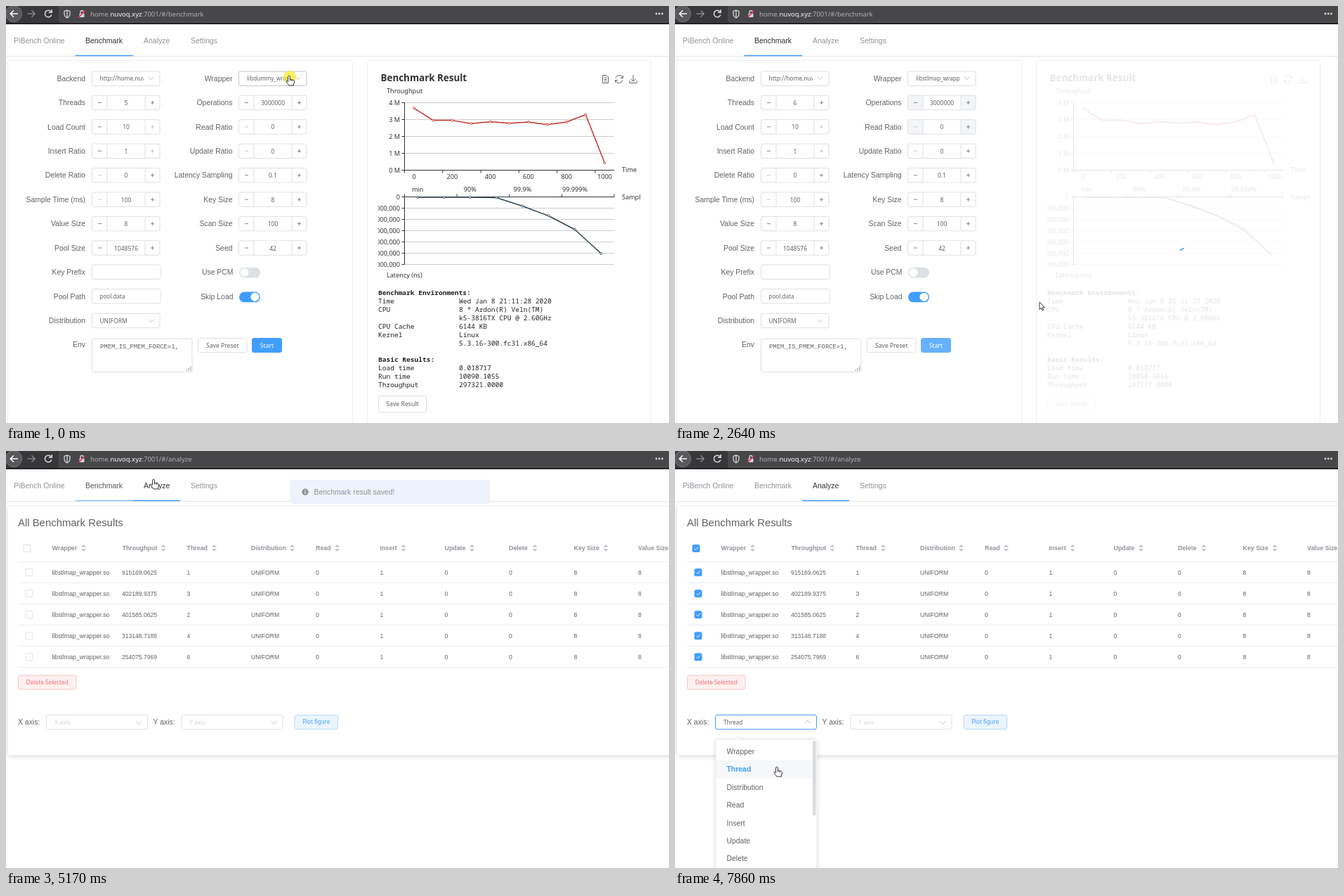
Animation of 944 by 593 pixels, one loop 8 s. Source, as an HTML page:

```html
<!DOCTYPE html>
<html lang="en">
<head>
<meta charset="utf-8">
<title>PiBench Online</title>
<style>
html, body { margin: 0; width: 100%; height: 100%; overflow: hidden; background: #fff; }
svg { display: block; width: 100vw; height: 100vh; }
text { white-space: pre; }
</style>
</head>
<body>
<svg id="stage" viewBox="0 0 944 593" xmlns="http://www.w3.org/2000/svg"></svg>
<script>
const stage = document.getElementById('stage');

const SANS = "'Liberation Sans', Arial, sans-serif";
const UI = "'Noto Sans', 'Open Sans', sans-serif";
const MONO = "'Noto Sans Mono', 'DejaVu Sans Mono', monospace";
const COURIER = "'Liberation Mono', monospace";
const BLUE = '#409eff', TEXT = '#606266', GREY = '#909399', DARK = '#303133';
const BORDER = '#dcdfe6', PALE = '#c0c4cc', LINE = '#ebeef5';

const HOLD = [220, 200, 200, 200, 200, 210, 190, 200, 210, 190, 200, 210, 210,
  200, 200, 210, 210, 230, 210, 210, 220, 200, 220, 210, 210, 220, 220, 200,
  210, 210, 200, 210, 230, 200, 200, 200, 200, 190, 140];
const LOOP = HOLD.reduce((a, b) => a + b);

// Pointer stops: step, x, y
const STOPS = [[0, 403, 99], [1, 403, 99], [3, 388, 160], [4, 388, 160], [6, 207, 137],
  [7, 207, 137], [9, 378, 485], [12, 378, 485], [13, 519, 421], [15, 519, 421],
  [17, 545, 545], [18, 553, 558], [20, 555, 561], [21, 555, 561], [22, 308, 200],
  [23, 235, 80], [24, 210, 40], [25, 210, 40], [27, 50, 130], [28, 29, 136],
  [29, 29, 136], [30, 70, 254], [32, 82, 381], [33, 82, 381], [36, 145, 449], [38, 145, 449]];
const ARROW = [5, 8, 13, 14, 15, 16, 22, 23, 26, 27, 30, 31];
const CLICKS = [0, 4, 7, 10, 21, 24, 28, 33, 37];

const RUNS = [
  { max: 4, step: 1, drops: 6,
    rate: [3.67, 2.95, 2.95, 2.76, 2.87, 2.78, 2.85, 2.7, 2.85, 3.29, 0.42],
    latency: [272, 272, 272, 272.5, 284.5, 298.5, 318, 352],
    time: '21:11:28', results: ['0.018717', '10090.1055', '297321.0000'] },
  { max: 3.5, step: 0.5, drops: 5,
    rate: [3.24, 2.53, 2.34, 2.43, 2.47, 2.42, 2.45, 2.36, 2.51, 2.43, 2.36, 2.53],
    latency: [272, 272, 272, 274.5, 291.5, 314.5, 331, 360],
    time: '21:12:07', results: ['0.014254', '11807.5000', '254075.7969'] }
];

// y is the vertical middle of the text
const text = (x, y, s, size, fill, font = SANS, extra = '') =>
  `<text x="${x}" y="${y + size * 0.36}" font-size="${size}" fill="${fill}" font-family="${font}" ${extra}>${s}</text>`;
const END = 'text-anchor="end"', MID = 'text-anchor="middle"', BOLD = 'font-weight="700"';
const box = (x, y, w, h, fill, stroke = 'none', r = 2.5, extra = '') =>
  `<rect x="${x}" y="${y}" width="${w}" height="${h}" rx="${r}" fill="${fill}" stroke="${stroke}" ${extra}/>`;
const path = (d, stroke, w = 1, fill = 'none', extra = '') =>
  `<path d="${d}" stroke="${stroke}" stroke-width="${w}" fill="${fill}" ${extra}/>`;
const dot = (x, y, r, fill, stroke = 'none', w = 1) =>
  `<circle cx="${x}" cy="${y}" r="${r}" fill="${fill}" stroke="${stroke}" stroke-width="${w}"/>`;
const group = (s, attrs) => `<g ${attrs}>${s}</g>`;
const times = (n, fn) => Array.from({ length: n }, (_, i) => fn(i)).join('');
const hline = (x1, x2, y, c) => path(`M${x1} ${y}H${x2}`, c);
const rowY = i => 103 + 34.43 * i;

const DEFS = `<defs>
  <clipPath id="backend"><rect x="130" y="90" width="66" height="26"/></clipPath>
  <clipPath id="wrapper"><rect x="340" y="90" width="65" height="26"/></clipPath>
  <clipPath id="chart"><rect x="530" y="90" width="374" height="300"/></clipPath>
  <filter id="shadow" x="-10%" y="-10%" width="120%" height="120%">
    <feDropShadow dx="0" dy="1.5" stdDeviation="3" flood-color="#000" flood-opacity=".14"/>
  </filter></defs>`;

function browserBar(page) {
  const light = '#d7d7db', white = '#f9f9fa', y = 12;
  return box(0, 0, 944, 26, '#38383b', 'none', 0) + box(76, -2, 868, 25, '#474749', '#56565a', 2) +
    box(0, 24, 944, 2, '#232326', 'none', 0) +
    dot(11, 11, 11.5, '#59595d', '#77777b') +
    path('M17 11H6.5M11 6.3L6.3 11L11 15.7', white, 1.6) +
    path('M30.500 11H41M36.500 6.300L41.200 11L36.500 15.700', '#85858a', 1.5) +
    path('M64 8A4.800 4.800 0 1 0 64.800 12.500M65.200 5V9.200H61', light, 1.6) +
    path('M87 6L91 7.500V11Q91 15 87 17Q83 15 83 11V7.500ZM87 6V17', light, 1.3) +
    box(104.5, 10.5, 7, 5.5, light, 'none', 1) + path('M106 10.500V8.500A2 2 0 0 1 110 8.500V10.500', light, 1.3) +
    path('M103 16.500L113 6.500', '#e22850', 1.6) +
    text(120, y, `home.<tspan fill="${white}">nuvoq.xyz</tspan>:7001/#/${page}`, 9.5, '#b1b1b5', UI) +
    times(3, i => dot(926 + 4.2 * i, 11, 1.4, light));
}

function tabs(k) {
  const analyze = k >= 25;
  const fade = k === 25 ? '#55585e' : GREY;
  return hline(0, 944, 71.5, '#e6e6e6') +
    text(11, 49, 'PiBench Online', 10.55, GREY) +
    text(113, 49, 'Benchmark', 10.5, analyze ? fade : DARK) +
    text(196, 49, 'Analyze', 10.5, k >= 24 ? DARK : GREY) +
    text(263, 49, 'Settings', 10.5, GREY) +
    (k <= 25 ? box(98.5, 69.8, 82.5, 1.5, BLUE, 'none', 0, `opacity="${analyze ? 0.6 : 1}"`) : '') +
    (analyze ? box(181, 69.8, 67, 1.5, BLUE, 'none', 0) : '');
}

const caret = (x, y, up) => {
  const d = up ? -2 : 2;
  return path(`M${x - 3.7} ${y - d}L${x} ${y + d}L${x + 3.7} ${y - d}`, PALE, 1);
};

function stepper(x, y, value, { low, high, focus, tint } = {}) {
  const edge = focus ? '#8cc5ff' : BORDER, cell = tint ? '#f3f5f9' : '#fff';
  const sign = (cx, off, plus) =>
    path(`M${cx - 2.500} ${y}h5` + (plus ? `M${cx} ${y - 2.500}v5` : ''), off ? PALE : '#77797e', 0.9);
  return box(x, y - 10.2, 96.5, 20.4, cell, edge) +
    box(x + 21.5, y - 9.7, 54, 19.4, '#fff', 'none', 0) +
    path(`M${x + 21.500} ${y - 10}v20M${x + 75.500} ${y - 10}v20`, BORDER) +
    sign(x + 11, low) + sign(x + 86, high, true) +
    text(x + 48.5, y + 0.5, value, 8.5, TEXT, UI, MID);
}

function button(x, y, w, h, label, size, ink, fill, edge) {
  return box(x, y, w, h, fill, edge) + text(x + w / 2, y + h / 2, label, size, ink, UI, MID);
}

function popper(x, y, w, h, body, opacity) {
  return group(box(x, y, w, h, '#fff', '#e4e7ed', 3, 'filter="url(#shadow)"') +
    path(`M${x + 26} ${y + 0.500}l4.500 -4.500l4.500 4.500`, '#e4e7ed', 1, '#fff') + body, `opacity="${opacity}"`);
}

function form(k) {
  const left = ['Backend', 'Threads', 'Load Count', 'Insert Ratio', 'Delete Ratio', 'Sample Time (ms)',
    'Value Size', 'Pool Size', 'Key Prefix', 'Pool Path', 'Distribution', 'Env'];
  const right = ['Wrapper', 'Operations', 'Read Ratio', 'Update Ratio', 'Latency Sampling', 'Key Size',
    'Scan Size', 'Seed', 'Use PCM', 'Skip Load'];
  const leftVals = [k >= 7 ? 6 : 5, 10, 1, 0, 100, 8, 1048576];
  const rightVals = [3000000, 0, 0, 0.1, 8, 100, 42];
  const open = k >= 1 && k <= 3;
  const wrapEdge = open ? BLUE : k === 0 || k === 4 ? PALE : BORDER;
  const toggle = (y, on) => box(332, y - 7.3, 30, 14.8, on ? BLUE : BORDER, 'none', 7.4) +
    dot(on ? 354.5 : 339.5, y, 6.1, '#fff');
  let s = path('M2.500 600V80Q2.500 77.500 5 77.500H491Q493.500 77.500 493.500 80V600', LINE) +
    left.map((l, i) => text(113, rowY(i), l, 10.43, TEXT, SANS, END)).join('') +
    right.map((l, i) => text(i < 8 ? 322.5 : 323.5, rowY(i), l, 10.43, TEXT, SANS, END)).join('');

  s += box(122.5, 93, 96.5, 20.4, '#fff', BORDER) + caret(206.5, 102.8) +
    text(133.5, 103.3, 'http://home.nuvoq.xyz', 8.4, TEXT, UI, 'clip-path="url(#backend)"') +
    box(331.5, 93, 96.5, 20.4, '#fff', wrapEdge) + caret(415.5, 102.8, open) +
    text(343, 103.3, k >= 4 ? 'libstlmap_wrapper.so' : 'libdummy_wrapper.so', 8.1, TEXT, UI, 'clip-path="url(#wrapper)"');

  leftVals.forEach((v, i) => s += stepper(122.5, rowY(i + 1), v,
    { low: i === 3 || i === 4, high: i === 1 || i === 2, focus: i === 0 && k >= 6 && k <= 10 }));
  rightVals.forEach((v, i) => s += stepper(331.5, rowY(i + 1), v,
    { low: i === 1 || i === 2, tint: i < 2 && k >= 4 }));

  s += box(122.5, 368, 97.5, 20.4, '#fff', BORDER) + box(122.5, 402.5, 97.5, 20.4, '#fff', BORDER) +
    text(133.5, 413.5, 'pool.data', 8.1, TEXT, UI) +
    box(122.5, 437.3, 96.5, 20.4, '#fff', BORDER) + text(133.5, 448, 'UNIFORM', 8.4, TEXT, UI) + caret(206.5, 447.5) +
    toggle(379, false) + toggle(413.8, true) +
    box(122.5, 473, 142.5, 47.5, '#fff', BORDER) +
    text(134, 483.3, 'PMEM_IS_PMEM_FORCE=1,', 8.9, TEXT, COURIER) +
    times(3, i => times(i + 1, j => box(262 - 2.8 * j, 512.5 + 2.4 * i, 1.4, 1.4, '#8c8c8c', 'none', 0))) +
    button(273.5, 472.5, 69.5, 20, 'Save Preset', 8.65, TEXT, '#fff', BORDER);
  const start = k >= 9 && k <= 17 ? '#66b1ff' : BLUE;
  s += button(350.5, 472.5, 42, 20, 'Start', 8.6, '#fff', start, start);

  if (k >= 1 && k <= 4) {
    const hover = k === 1 ? 0 : 1;
    const items = box(332, 128.5 + 25.4 * hover, 137, 25.4, '#f5f7fa', 'none', 0) +
      ['libdummy_wrapper.so', 'libstlmap_wrapper.so'].map((l, i) => {
        const picked = (k >= 4 ? 1 : 0) === i;
        return text(346, 141.5 + 25.4 * i, l, 10.4, picked ? BLUE : TEXT, SANS, picked ? BOLD : '');
      }).join('');
    s += popper(331.5, 124, 138, 59, items, k === 1 || k === 4 ? 0.55 : 1);
  }
  return s;
}

function line(points, color) {
  return path('M' + points.map(p => p.join(' ')).join('L'), color, 1.5, 'none', 'stroke-linejoin="round"') +
    points.map(p => dot(p[0], p[1], 1.5, '#fff', color, 0.9)).join('');
}

function charts(run) {
  const x0 = 567.5, x1 = 866, ink = '#333', grid = '#ccc';
  const n = run.rate.length, w = (x1 - x0) / n, rows = run.max / run.step;
  const label = (x, y, s, extra) => text(x, y, s, 9.1, ink, UI, extra);
  let s = label(542, 121, 'Throughput') + label(877, 233, 'Time') + label(877, 272, 'Sampl');

  for (let i = 0; i <= rows; i++) {
    const y = 233.5 - 96 * i / rows;
    s += (i ? hline(x0, x1, y, grid) : '') + hline(x0 - 4, x0, y, ink) +
      label(561, y, `${i * run.step} M`, END);
  }
  s += path(`M${x0} 137.500V233.500H${x1}`, ink);
  for (let i = 0; i <= n; i += 2) {
    s += path(`M${x0 + w * i} 233.500v4`, ink);
    if (i < n) s += label(x0 + w * (i + 0.5), 243, i * 100, MID);
  }
  s += line(run.rate.map((v, i) => [x0 + w * (i + 0.5), 233.2 - 95.7 * v / run.max]), '#c23531');

  for (let i = 0; i <= run.drops; i++) {
    const y = 271.5 + 96 * i / run.drops;
    s += (i ? hline(x0, x1, y, grid) : '') + hline(x0 - 4, x0, y, ink) +
      label(561, y, i ? `${i},000,000` : '0', END);
  }
  s += path(`M${x0} 367.500V271.500H${x1}`, ink);
  const c = (x1 - x0) / 8;
  ['min', '90%', '99.9%', '99.999%'].forEach((l, i) => s += label(x0 + c * (2 * i + 0.5), 261, l, MID));
  s += times(5, i => path(`M${x0 + c * 2 * i} 267.500v4`, ink)) +
    line(run.latency.map((y, i) => [x0 + c * (i + 0.5), y]), '#2f4554') +
    label(542, 383, 'Latency (ns)');
  return group(s, 'clip-path="url(#chart)"');
}

function result(k) {
  const run = RUNS[k >= 16 ? 1 : 0], icon = '#666';
  const mono = (x, y, s, extra) => text(x, y, s, 9.56, '#222', MONO, extra);
  const rows = [['Time', `Wed Jan 8 ${run.time} 2020`], ['CPU', '8 * Ardon(R) Veln(TM)'],
    ['', 'k5-3816TX CPU @ 2.60GHz'], ['CPU Cache', '6144 KB'], ['Kernel', 'Linux'],
    ['', '5.3.16-300.fc31.x86_64']];
  let s = text(533.5, 102, 'Benchmark Result', 13.4, '#333', UI, BOLD) +
    path('M849.500 98.500H855L857.500 101V109.500H849.500ZM851.500 102H855.500M851.500 104.500H855.500M851.500 107H855.500', icon) +
    path('M868 102.500A5.200 5.200 0 0 1 878 102M878 105.500A5.200 5.200 0 0 1 868 106M878.500 99V102.500H875M867.500 109V105.500H871', icon) +
    path('M893 98V107M889.500 103.800L893 107.300L896.500 103.800M888 106V109.500H898V106', icon) +
    charts(run) + mono(530, 408, 'Benchmark Environments:', BOLD);
  rows.forEach((r, i) => s += mono(530, 420 + 11.9 * i, r[0]) + mono(645, 420 + 11.9 * i, r[1]));
  s += mono(530, 502.5, 'Basic Results:', BOLD);
  ['Load time', 'Run time', 'Throughput'].forEach((l, i) =>
    s += mono(530, 514.5 + 11.9 * i, l) + mono(645, 514.5 + 11.9 * i, run.results[i]));
  const hot = k >= 18;
  s += button(530.5, 554.5, 68, 23.5, 'Save Result', 8.7, hot ? BLUE : TEXT, hot ? '#ecf5ff' : '#fff', hot ? '#8cc5ff' : BORDER);

  const veil = { 11: 0.5, 16: 0.4 }[k] || (k >= 12 && k <= 15 ? 0.88 : 0);
  if (veil) {
    s += box(515, 78, 403, 520, '#fff', 'none', 0, `opacity="${veil}"`);
    const len = 5 + 22 * ((k + 2) % 3), turn = 50 + 110 * (k - 13);
    s += `<circle cx="716" cy="335" r="12.5" fill="none" stroke="${BLUE}" stroke-width="1.5" ` +
      `stroke-linecap="round" stroke-dasharray="${len} 90" transform="rotate(${turn} 716 335)"/>`;
  }
  return s + path('M514.500 600V80Q514.500 77.500 517 77.500H915.500Q918.500 77.500 918.500 80V600', LINE);
}

function table(k) {
  const checked = k >= 29;
  const heads = [['Wrapper', 65.5, 110.5], ['Throughput', 165.5, 224], ['Thread', 257.5, 296.5],
    ['Distribution', 349, 407.5], ['Read', 441, 471.5], ['Insert', 532.5, 566], ['Update', 624.5, 663.5],
    ['Delete', 716, 753], ['Key Size', 808.5, 854], ['Value Size', 900, 960]];
  const runs = [['915169.0625', 1], ['402189.9375', 3], ['401585.0625', 2], ['313148.7188', 4], ['254075.7969', 6]];
  const check = (x, y) => box(x - 5, y - 5, 10, 10, checked ? BLUE : '#fff', checked ? BLUE : BORDER, 1.5) +
    (checked ? path(`M${x - 2.600} ${y}l2 2l3.400 -4`, '#fff') : '');
  const select = (x, label, ink, edge, up) => box(x, 375.3, 144, 20.4, '#fff', edge) +
    text(x + 11.5, 386, label, 8.3, ink, UI) + caret(x + 131.5, up ? 385 : 386.5, up);

  let s = box(2.5, 78, 960, 354.5, '#fff', LINE, 3, 'filter="url(#shadow)"') +
    box(0, 72, 944, 5, '#fff', 'none', 0) +
    text(17, 101.5, 'All Benchmark Results', 14.9, TEXT) + check(30, 138.5);
  heads.forEach(([l, x, a]) => s += text(x, 138, l, 8.85, GREY, SANS, BOLD) +
    path(`M${a - 3.500} 136.800h7l-3.500 -3.700zM${a - 3.500} 139.200h7l-3.500 3.700z`, 'none', 0, PALE));
  s += times(6, i => hline(17, 944, 157.5 + 30 * i, LINE));
  runs.forEach(([rate, threads], i) => {
    const y = 172.7 + 30.05 * i;
    s += check(33, y);
    ['libstlmap_wrapper.so', rate, threads, 'UNIFORM', 0, 1, 0, 0, 8, 8].forEach((v, c) =>
      s += text(heads[c][1] - (c === 1 ? 0.5 : 0), y, v, c === 0 ? 8.73 : 8.58, TEXT));
  });
  const open = k >= 33, picked = k >= 37;
  s += button(17.5, 319, 82.5, 20, 'Delete Selected', 8.27, '#f56c6c', '#fef0f0', '#fbc4c4') +
    text(17, 385.5, 'X axis:', 10.43, TEXT) + text(209.5, 385.5, 'Y axis:', 10.43, TEXT) +
    select(57.5, picked ? 'Thread' : 'X axis', picked ? TEXT : '#d3d6dc', open ? BLUE : k === 32 ? PALE : BORDER, open) +
    select(250, 'Y axis', '#d3d6dc', BORDER) +
    button(411, 375.7, 61.5, 19.8, 'Plot figure', 8.0, BLUE, '#ecf5ff', '#b3d8ff');

  if (open) {
    const hover = k >= 36 ? 1 : k === 35 ? 0 : -1;
    let items = hover < 0 ? '' : box(58.5, 414.6 + 25.4 * hover, 143, 25.4, '#f5f7fa', 'none', 0);
    ['Wrapper', 'Thread', 'Distribution', 'Read', 'Insert', 'Update', 'Delete'].forEach((l, i) => {
      const on = picked && i === 1;
      items += text(73.5, 427.2 + 25.4 * i, l, 10.43, on ? BLUE : TEXT, SANS, on ? BOLD : '');
    });
    if (k >= 34) items += box(196, 412, 4.5, 106.5, '#d8dadd', 'none', 2.2);
    s += popper(58, 410, 144, 200, items, k === 33 ? 0.55 : 1);
  }
  return s;
}

function message(label, dy, opacity) {
  return group(box(405.5, 41.5, 283, 33, '#edf2fc', LINE, 3) + dot(426, 58.2, 4.7, GREY) +
    path('M426 57.500v3.200M426 55.300v1.200', '#fff', 1.2) + text(438.5, 58.3, label, 10.45, GREY),
    `transform="translate(0 ${dy})" opacity="${opacity}"`);
}

function pointer(k) {
  const n = STOPS.findIndex(p => p[0] >= k), b = STOPS[n], a = STOPS[Math.max(0, n - 1)];
  const f = b[0] === a[0] ? 1 : (k - a[0]) / (b[0] - a[0]);
  const x = a[1] + (b[1] - a[1]) * f, y = a[2] + (b[2] - a[2]) * f;
  const shape = ARROW.includes(k)
    ? path('M0 0V10.500L2.400 8.300L4 12L5.800 11.200L4.200 7.700H7.400Z', '#222', 0.9, '#fff')
    : path('M-1.400 1Q0 -1 1.400 1V5L6 6.300Q7.800 7 7.600 9L6.500 12V14H0L-4 8.800Q-4 6.500 -1.400 8.500ZM1.400 5V7.500M4 6V8', '#222', 0.9, '#fff');
  return (CLICKS.includes(k) ? group(dot(x + 1, y + 2, 9, '#f6e71d'), 'opacity=".7"') : '') +
    group(shape, `transform="translate(${x} ${y})"`);
}

function draw(k) {
  const analyze = k >= 25;
  let s = DEFS + box(0, 0, 944, 593, '#fff', 'none', 0) + browserBar(analyze ? 'analyze' : 'benchmark') + tabs(k);
  s += analyze ? table(k) : form(k) + result(k);
  if (k === 11 || k === 12) s += message('Benchmark started!', k === 11 ? -5 : 0, k === 11 ? 0.7 : 1);
  if (k >= 22 && k <= 28) s += message('Benchmark result saved!', k === 28 ? -8 : 0, k === 28 ? 0.5 : 1);
  stage.innerHTML = s + pointer(k);
}

function stepAt(ms) {
  let k = 0;
  while (ms >= HOLD[k]) ms -= HOLD[k++];
  return k;
}

let shown = -1;
const begin = performance.now();
function tick() {
  const k = stepAt((performance.now() - begin) % LOOP);
  if (k !== shown) draw(shown = k);
  requestAnimationFrame(tick);
}
tick();
</script>
</body>
</html>
```
